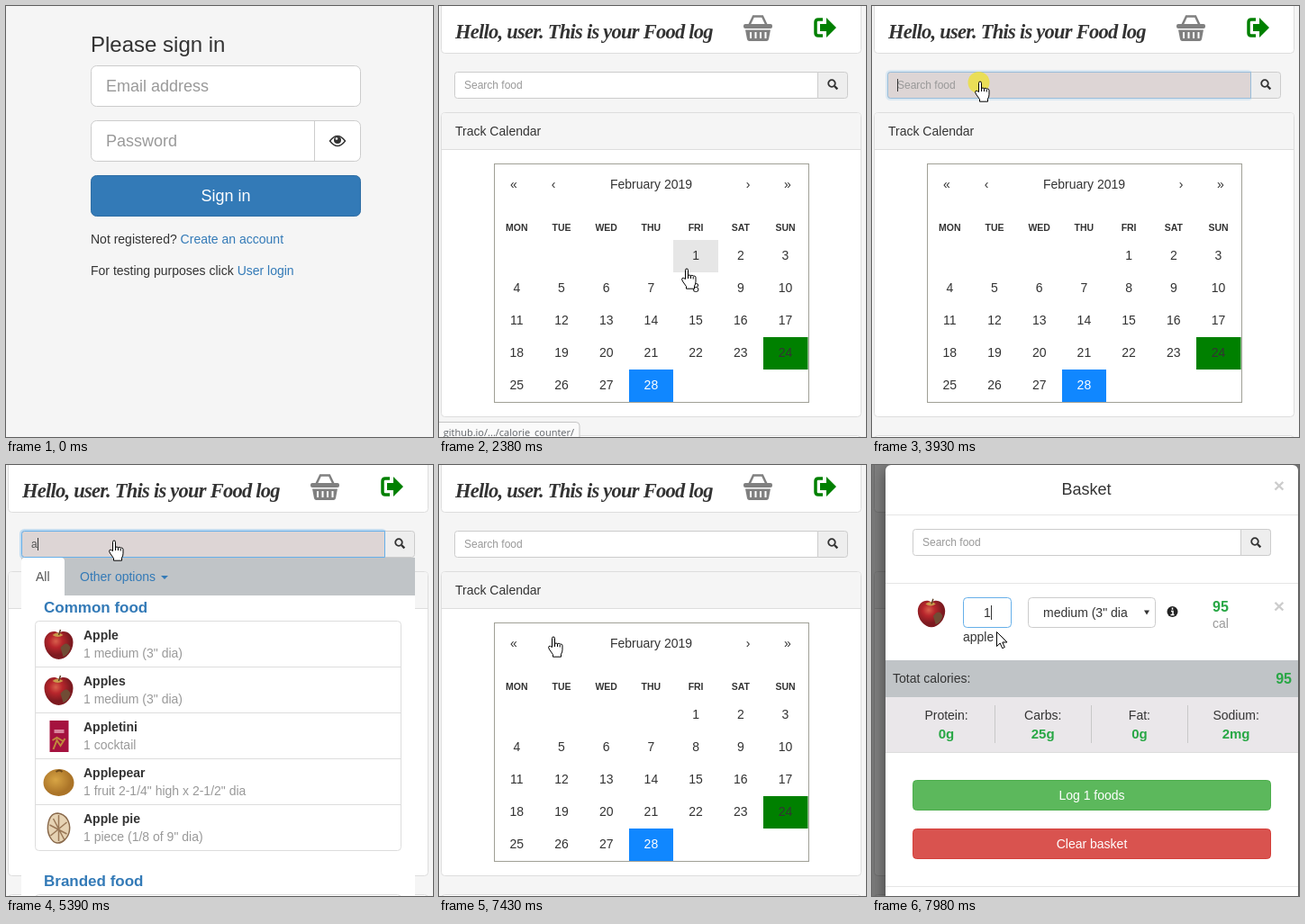
Recreate the animation shown at these times as an HTML page. Size 474x479 px, loop 8000 ms.

```html
<!DOCTYPE html>
<html lang="en">
<head>
<meta charset="utf-8">
<title>Food log</title>
<style>
html, body { margin: 0; width: 100%; height: 100%; overflow: hidden; background: #f5f5f5; }
svg { display: block; }
text { font: 14px "Liberation Sans", Arial, sans-serif; fill: #333; white-space: pre; }
.mid { text-anchor: middle; }
.end { text-anchor: end; }
.bold { font-weight: bold; }
.big { font-size: 18px; }
.small { font-size: 12px; fill: #555; }
.hint { fill: #999; }
.white { fill: #fff; }
.link { fill: #337ab7; }
.link.hover { fill: #23527c; text-decoration: underline; }
.green { fill: #28a745; font-weight: bold; }
.head { font-size: 17px; font-weight: bold; fill: #337ab7; }
.day { font-size: 10.5px; font-weight: bold; }
.close { font-size: 21px; font-weight: bold; fill: #ccc; }
.title { font: italic bold 22.5px "Liberation Serif", serif; letter-spacing: -.75px; }
.status { font: 11px "Open Sans", sans-serif; fill: #5f6368; }
.field { fill: #fff; stroke: #ccc; }
.panel { fill: #fff; stroke: #ddd; }
.addon { fill: #eee; stroke: #ccc; }
.rule { stroke: #e5e5e5; }
.caret { stroke: #333; }
#sheet { filter: drop-shadow(0 5px 8px rgba(0, 0, 0, .5)); }
</style>
</head>
<body>
<svg width="474" height="479" viewBox="0 0 474 479">
  <defs>
    <radialGradient id="red" cx=".4" cy=".35"><stop offset="0" stop-color="#d8604c"/><stop offset=".45" stop-color="#b8262c"/><stop offset="1" stop-color="#7d1a20"/></radialGradient>
    <radialGradient id="tan" cx=".4" cy=".4"><stop offset="0" stop-color="#d8a545"/><stop offset="1" stop-color="#ab7428"/></radialGradient>
    <g id="apple">
      <path d="M0-13C6-18 16-13 16-3C16 7 8 16 0 16S-16 7-16-3C-16-13-6-18 0-13Z" fill="url(#red)"/>
      <path d="M2 3q7-9 11 0q-2 8-8 10z" fill="#704c35"/>
      <path d="M-7-11q6-5 12 0q-6 4-12 0z" fill="#c99a4b"/>
      <path d="M0-11l2-6" stroke="#5a3a22" stroke-width="1.5"/>
    </g>
    <g id="drink">
      <rect x="-10" y="-18" width="21" height="35" fill="#a5123f"/>
      <rect x="-5" y="-8" width="11" height="4" fill="#d9849c"/>
      <path d="M-6 14l4-10 4 6 5-8M-7 4l5-3 7 4" fill="none" stroke="#c08a3c" stroke-width="2"/>
    </g>
    <g id="pear">
      <ellipse rx="17" ry="15" fill="url(#tan)"/><path d="M-3-12q4-3 7 0" stroke="#6e4a1b" fill="none" stroke-width="2"/>
    </g>
    <g id="pie">
      <path d="M-1-17C9-16 13-6 12 2S4 17-2 16S-13 6-12-3S-7-17-1-17Z" fill="#e6d3b4" stroke="#8a6a4c" stroke-width="1.5"/>
      <path d="M0-15V14M-10-4L9 6M9-7L-9 8M-6-11L6 12" stroke="#9a7857" stroke-width="1.5"/>
    </g>
    <g id="lens" fill="none" stroke="#333"><circle cx="-1" cy="-1" r="3.8" stroke-width="1.8"/><path d="M2 2l3.3 3.3" stroke-width="2.4"/></g>
  </defs>

  <g id="login">
    <rect width="474" height="479" fill="#f5f5f5"/>
    <text x="94" y="51" style="font-size:24px">Please sign in</text>
    <rect class="field" x="94.5" y="66.5" width="299" height="45" rx="6"/>
    <text class="big hint" x="111" y="95">Email address</text>
    <rect class="field" x="94.5" y="127.5" width="299" height="45" rx="6"/>
    <path d="M342.5 127v46" stroke="#ccc"/>
    <text class="big hint" x="111" y="156">Password</text>
    <path d="M359.5 150q8.500-11 17 0q-8.500 11-17 0z" fill="none" stroke="#333" stroke-width="1.5"/>
    <circle cx="368" cy="149" r="4" fill="#333"/><circle cx="367" cy="147.500" r="1.3" fill="#fff"/>
    <rect x="94.5" y="188.500" width="299" height="45" rx="6" fill="#337ab7" stroke="#2e6da4"/>
    <text class="big white mid" x="244" y="217">Sign in</text>
    <text x="94" y="264">Not registered? <tspan class="link">Create an account</tspan></text>
    <text x="94" y="299">For testing purposes click <tspan class="link" id="loginLink">User login</tspan></text>
  </g>

  <g id="log">
    <rect width="474" height="479" fill="#f5f5f5"/>
    <rect class="panel" x="2.500" y="-9.500" width="466" height="62" rx="4"/>
    <text class="title" x="18" y="36">Hello, user. This is your Food log</text>
    <g id="basket" fill="#808080">
      <path d="M344 22l5-10.500h10l5 10.500" fill="none" stroke="currentColor" stroke-width="2.500"/>
      <rect x="338" y="20" width="32" height="5" rx="2"/>
      <path d="M340 26.500h28l-2 10.500q-.5 2-2.500 2h-19q-2 0-2.500-2z"/>
      <path d="M346 29v7M351.500 29v7M357 29v7M362.500 29v7" stroke="#fff" stroke-width="2"/>
    </g>
    <g id="badge"><circle cx="357" cy="19" r="9" fill="#e62e2e"/><text class="white mid" x="357" y="24">1</text></g>
    <path d="M426 15h-5q-3 0-3 3v12q0 3 3 3h5" fill="none" stroke="green" stroke-width="3.500"/>
    <path d="M423 20h7v-7l11 11-11 11v-7h-7z" fill="green"/>

    <rect class="panel" x="2.500" y="118.500" width="466" height="338" rx="4"/>
    <path d="M3 159.500V122q0-3 3-3h459q3 0 3 3v37.500z" fill="#f5f5f5"/>
    <path d="M3 159.500h465" stroke="#ddd"/>
    <text x="18" y="144">Track Calendar</text>
    <rect class="panel" x="2.500" y="477.500" width="466" height="40" rx="4"/>
    <g id="calendar">
      <rect x="61.500" y="175.500" width="349" height="265" fill="#fff" stroke="#a0a096"/>
      <rect id="tileHover" x="260" y="260" width="50" height="36" fill="#e6e6e6"/>
      <rect x="360" y="368" width="49.500" height="36" fill="green"/>
      <rect x="211" y="404" width="49" height="36" fill="#1087ff"/>
      <text class="mid" x="83" y="203">«</text><text class="mid" x="127" y="203">‹</text>
      <text class="mid" x="235.500" y="203">February 2019</text>
      <text class="mid" x="343" y="203">›</text><text class="mid" x="387" y="203">»</text>
    </g>

    <g id="focusGlow" fill="none" stroke="#66afe9">
      <rect x="16.500" y="72.500" width="405" height="31" rx="4" stroke-width="3" opacity=".35"/>
    </g>
    <path class="addon" d="M420.500 73.500h30q3 0 3 3v23q0 3-3 3h-30z"/>
    <use href="#lens" x="437" y="87"/>
    <path id="search" class="field" d="M420.500 73.500h-400q-3 0-3 3v23q0 3 3 3h400z"/>
    <path id="focusLine" d="M420.500 73.500h-400q-3 0-3 3v23q0 3 3 3h400z" fill="none" stroke="#66afe9"/>
    <text id="query" class="small" x="28" y="92"></text>
    <path id="caret" class="caret" d="M.5 81v14"/>

    <g id="dropdown">
      <rect x="17" y="103" width="437" height="376" fill="#fff"/>
      <rect x="17" y="103" width="437" height="42" fill="#c0c4c7"/>
      <path d="M17 145v-38q0-4 4-4h40q4 0 4 4v38z" fill="#fff"/>
      <path id="tabHover" d="M67 144v-37q0-4 4-4h122q4 0 4 4v37z" fill="#eee"/>
      <text x="33" y="129" style="fill:#555">All</text>
      <text id="tab" class="link" x="82" y="129">Other options</text>
      <path d="M172 123h8l-4 4z" fill="#337ab7"/>
      <text class="head" x="42" y="164">Common food</text>
      <rect class="panel" x="32.500" y="173.500" width="406" height="255" rx="4"/>
      <rect id="itemHover" x="33" y="174" width="405" height="50" fill="#f5f5f5"/>
      <g id="foods"></g>
      <text class="head" x="42" y="468">Branded food</text>
      <rect class="panel" x="32.500" y="477.500" width="406" height="50" rx="4"/>
    </g>
  </g>

  <g id="status">
    <path d="M-1 480v-17.500h153q4 0 4 4v14z" fill="#fafafa" stroke="#c4c4c4"/>
    <text class="status end" x="150" y="478">github.io/.../calorie_counter/</text>
  </g>

  <rect id="backdrop" width="474" height="479"/>
  <g id="modal">
    <rect id="sheet" x="15" width="458" height="533" rx="6" fill="#fff"/>
    <text class="big mid" x="238" y="33">Basket</text>
    <text class="close mid" x="452" y="30">×</text>
    <path class="rule" d="M15 55.500h458M15 131.500h458M15 468.500h458"/>
    <rect class="field" x="45.500" y="71.500" width="397" height="29" rx="3"/>
    <path class="addon" d="M409.500 71.500h30q3 0 3 3v23q0 3-3 3h-30z"/>
    <use href="#lens" x="426" y="86"/>
    <text class="small hint" x="56" y="90">Search food</text>
    <use href="#apple" transform="translate(66 165) scale(.95)"/>
    <rect x="101.500" y="147.500" width="53" height="33" rx="4" fill="#fff" stroke="#66afe9"/>
    <text class="mid" x="128" y="169">1</text>
    <path class="caret" d="M132.500 156v16"/>
    <text x="101" y="196">apple</text>
    <rect class="field" x="173.500" y="147.500" width="141" height="33" rx="4"/>
    <text x="190" y="169">medium (3" dia</text>
    <path d="M302 161.500h6l-3 5z" fill="#333"/>
    <circle cx="333.500" cy="163" r="6" fill="#222"/>
    <path d="M333.500 158.500v2.200M332 162.500h2v4M331.500 166.500h4" fill="none" stroke="#fff" stroke-width="1.500"/>
    <text class="green" x="378" y="163" style="font-size:16px">95</text>
    <text class="hint" x="378" y="181">cal</text>
    <text class="close mid" x="452" y="164">×</text>
    <rect x="15" y="217" width="458" height="41" fill="#c0c4c7"/>
    <text x="23" y="242">Totat calories:</text>
    <text class="green end" x="466" y="243" style="font-size:16px">95</text>
    <rect x="15" y="258" width="458" height="62" fill="#eae7ea"/>
    <path d="M15 319.500h458" stroke="#ddd"/>
    <path d="M136.500 267v42M243.500 267v42M350.500 267v42" stroke="#c8c8c8"/>
    <g id="nutrients"></g>
    <rect x="45.500" y="350.500" width="397" height="33" rx="4" fill="#5cb85c" stroke="#4cae4c"/>
    <text class="white mid" x="244" y="372">Log 1 foods</text>
    <rect x="45.500" y="404.500" width="397" height="33" rx="4" fill="#d9534f" stroke="#d43f3a"/>
    <text class="white mid" x="244" y="426">Clear basket</text>
    <rect x="396.500" y="484.500" width="61" height="33" rx="4" fill="#337ab7" stroke="#2e6da4"/>
    <text class="white mid" x="427" y="506">Close</text>
  </g>

  <circle id="click" r="12" fill="#eee02c" opacity=".75"/>
  <g id="cursor" fill="#fff" stroke="#000" stroke-linejoin="round">
    <path id="arrow" d="M.5.5V16.500L4.200 13l2.500 5.700 2.600-1.200L6.800 12H12z"/>
    <g id="hand">
      <path d="M-1.500 1.500q0-1.500 1.500-1.500t1.500 1.500v6q1.500-1 3 0q1.500-.6 2.700.5q2-.3 2.800 1.200v5q0 3-1.500 5v3h-9v-2.500L-4.500 14q-1.500-2.500-.5-3.500t3.500 1z"/>
      <path d="M1.500 7v4M4.500 8v3M7.200 9v2.500" fill="none"/>
    </g>
  </g>
</svg>
<script>
const LOOP = 8000;
const el = id => document.getElementById(id);
const show = (id, on) => { el(id).style.display = on ? '' : 'none'; };
const text = (x, y, cls, s) => `<text class="${cls}" x="${x}" y="${y}">${s}</text>`;

// Calendar grid
let cells = '';
const colX = col => 86.300 + col * 49.700;
['MON', 'TUE', 'WED', 'THU', 'FRI', 'SAT', 'SUN'].forEach((name, i) => {
  cells += text(colX(i), 250, 'day mid', name);
});
for (let d = 1; d <= 28; d++) {
  const slot = d + 3;
  cells += text(colX(slot % 7), 282 + 36 * Math.floor(slot / 7), d === 28 ? 'mid white' : 'mid', d);
}
el('calendar').innerHTML += cells;

const foods = [
  ['Apple', '1 medium (3" dia)', 'apple'],
  ['Apples', '1 medium (3" dia)', 'apple'],
  ['Appletini', '1 cocktail', 'drink'],
  ['Applepear', '1 fruit 2-1/4" high x 2-1/2" dia', 'pear'],
  ['Apple pie', '1 piece (1/8 of 9" dia)', 'pie'],
];
el('foods').innerHTML = foods.map(([name, portion, icon], i) => {
  const y = 173 + 51 * i;
  return (i ? `<path d="M33 ${y + .5}h405" stroke="#ddd"/>` : '') +
    `<use href="#${icon}" x="58.500" y="${y + 27}"/>` +
    text(86, y + 21, 'bold', name) + text(86, y + 41, 'hint', portion);
}).join('');

el('nutrients').innerHTML = [['Protein:', '0g'], ['Carbs:', '25g'], ['Fat:', '0g'], ['Sodium:', '2mg']]
  .map(([label, value], i) => {
    const x = 82.500 + 107.200 * i;
    return text(x, 283, 'mid', label) +
      `<text class="green mid" x="${x}" y="304" style="font-size:15px">${value}</text>`;
  }).join('');

// time, x, y, shape
const path = [
  [130, 372, 468, 'arrow'], [530, 335, 385, 'arrow'], [830, 280, 300, 'hand'], [910, 275, 292, 'hand'],
  [2690, 275, 292, 'hand'], [2840, 303, 268, 'hand'], [2990, 272, 222, 'arrow'], [3460, 138, 110, 'arrow'],
  [3600, 125, 96, 'hand'], [3760, 120, 84, 'hand'], [6869, 120, 84, 'hand'], [6870, 131, 124, 'hand'],
  [7160, 127, 191, 'hand'], [7730, 127, 191, 'arrow'], [7830, 127, 191, 'arrow'], [7980, 138, 185, 'arrow'],
];
const POINTER_STEP = 75;

function pointerAt(t) {
  const i = path.findLastIndex(p => p[0] <= t);
  const a = path[i], b = path[i + 1] || a;
  const moved = Math.floor((t - a[0]) / POINTER_STEP) * POINTER_STEP;
  const k = b === a ? 0 : Math.min(1, moved / (b[0] - a[0]));
  return { x: a[1] + (b[1] - a[1]) * k, y: a[2] + (b[2] - a[2]) * k, shape: a[3] };
}

const last = (steps, t) => steps.findLast(s => s[0] <= t);
const focusSteps = [[0, 0], [3930, .5], [4010, .8], [4090, 1], [7350, .5], [7430, 0]];
const querySteps = [[0, ''], [5390, 'a'], [5640, 'ap'], [5940, 'app'], [7350, '']];
const caretSteps = [[0, 0], [3760, 28], [4460, 0], [5010, 28], [5390, 35], [5640, 42], [5940, 48], [6500, 0]];
// time, opacity, vertical offset
const modalSteps = [[0, 0, -133], [7830, .45, -72], [7900, .9, -25], [7980, 1, 0]];

function render(t) {
  const within = (from, to) => t >= from && t < to;
  const inLog = t >= 2380;
  show('login', !inLog);
  show('log', inLog);
  el('loginLink').classList.toggle('hover', t >= 830);
  show('status', within(990, 2690));
  show('tileHover', within(2380, 2915));

  const focus = last(focusSteps, t)[1];
  el('focusGlow').style.opacity = el('focusLine').style.opacity = focus;
  el('search').style.fill = within(3600, 6870) ? '#ddd5d5' : '#fff';
  const query = last(querySteps, t)[1];
  el('query').textContent = query || 'Search food';
  el('query').classList.toggle('hint', !query);
  const caretX = last(caretSteps, t)[1];
  show('caret', caretX);
  el('caret').setAttribute('transform', `translate(${caretX})`);

  const onTab = within(6870, 6945);
  show('dropdown', within(5390, 7350));
  show('tabHover', onTab);
  el('tab').style.fill = onTab ? '#23527c' : '';
  show('itemHover', within(7090, 7350));

  const filled = t >= 7730;
  show('badge', filled);
  el('basket').style.fill = el('basket').style.color = filled ? 'green' : '#808080';

  const [, opacity, shift] = last(modalSteps, t);
  el('backdrop').style.opacity = opacity / 2;
  show('modal', opacity);
  el('modal').style.opacity = opacity;
  el('modal').setAttribute('transform', `translate(0 ${shift})`);

  show('cursor', t >= 130);
  show('click', within(1060, 1290) || within(3930, 4090));
  if (t < 130) return;
  const { x, y, shape } = pointerAt(t);
  el('cursor').setAttribute('transform', `translate(${x} ${y})`);
  show('arrow', shape === 'arrow');
  show('hand', shape === 'hand');
  el('click').setAttribute('transform', `translate(${x - 1.500} ${y + 1})`);
}

const start = performance.now();
function tick() {
  render((performance.now() - start) % LOOP);
  requestAnimationFrame(tick);
}
tick();
</script>
</body>
</html>
```
